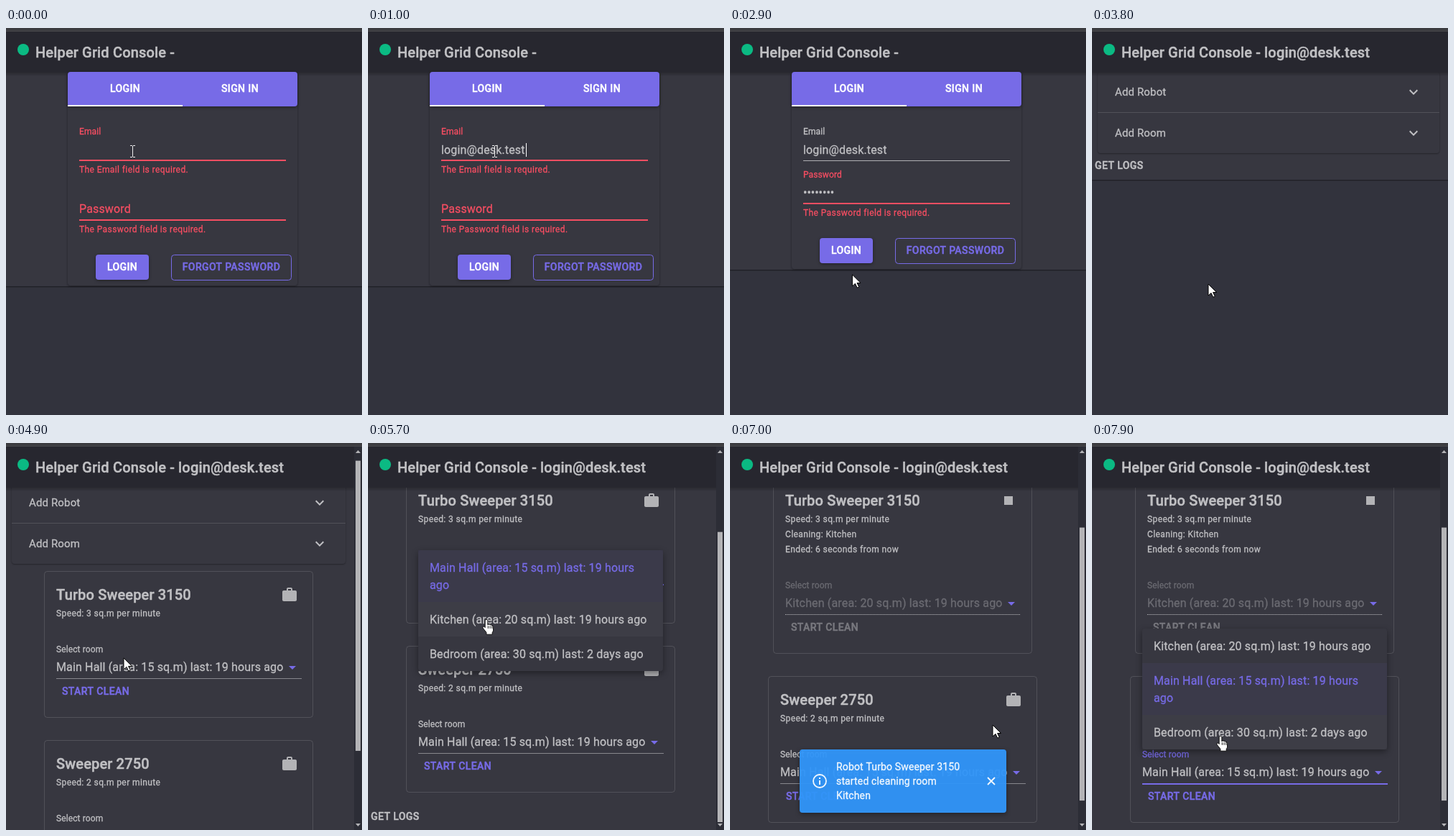
These frames come from a looping animation (496x538 px, 8000 ms). An HTML page with a canvas:

```html
<!DOCTYPE html>
<html lang="en">
<head>
<meta charset="utf-8">
<title>Robot control panel</title>
<style>
html, body { margin: 0; width: 100%; height: 100%; overflow: hidden; background: #32333d; }
canvas { display: block; width: 496px; height: 538px; }
</style>
</head>
<body>
<canvas id="stage" width="496" height="538"></canvas>
<script>
const c = document.getElementById('stage').getContext('2d');
const W = 496, H = 538, LOOP = 8000, BAR_TOP = 5;
const BG = '#32333d', SURFACE = '#373740', PRIMARY = '#776be7', ERROR = '#f64e62';
const TEXT = '#c1c1c4', FADED = '#6b6b72', LINE = 'rgba(255,255,255,.13)';
const white = a => `rgba(255,255,255,${a})`;

const EMAIL = 'login@desk.test';
const BOT_A = 'Turbo Sweeper 3150', BOT_B = 'Sweeper 2750';
const KITCHEN = 'Kitchen (area: 20 sq.m) last: 19 hours ago';
const HALL = 'Main Hall (area: 15 sq.m) last: 19 hours ago';
const BEDROOM = 'Bedroom (area: 30 sq.m) last: 2 days ago';

const ICON = {
  work: new Path2D('M10 2h4c1.1 0 2 .9 2 2v2h4c1.1 0 2 .9 2 2v11c0 1.1-.9 2-2 2H4c-1.1 0-2-.9-2-2V8c0-1.1.9-2 2-2h4V4c0-1.1.9-2 2-2zm4 4V4h-4v2h4z'),
  stop: new Path2D('M6 6h12v12H6z'),
  chevron: new Path2D('M16.6 8.6L12 13.2 7.4 8.6 6 10l6 6 6-6z'),
  drop: new Path2D('M7 10l5 5 5-5z'),
  arrow: new Path2D('M0 0v16l4-3.6 2.7 5.8 2.6-1.2-2.7-5.5h5z'),
  hand: new Path2D('M-2 1.5q2-3 4 0v7l1-.8q2-.6 2.6.8q2.2-.6 2.8 1q2-.2 2 2v5q0 2-1.5 3.5v3h-9v-3l-5.5-7q-.5-2.5 2-2l1.6 1.6z')
};

// Pointer keys: time, x, y, shape used until the next key
const POINTER = [
  [0, 176, 171, 'beam'], [2050, 176, 171, 'arrow'], [2400, 190, 412, 'arrow'],
  [2750, 176, 362, 'arrow'], [3100, 162, 314, 'hand'], [3650, 162, 314, 'arrow'],
  [3790, 162, 356, 'arrow'], [4650, 162, 356, 'arrow'], [5300, 168, 184, 'hand'],
  [5550, 168, 184, 'hand'], [5680, 165, 245, 'hand'], [5850, 165, 245, 'hand'],
  [6000, 130, 212, 'hand'], [6120, 130, 212, 'arrow'], [6280, 272, 318, 'arrow'],
  [6400, 272, 318, 'arrow'], [6680, 365, 365, 'hand'], [6800, 365, 365, 'arrow'],
  [6980, 366, 392, 'arrow'], [7050, 366, 392, 'arrow'], [7220, 365, 469, 'hand'],
  [7340, 365, 469, 'hand'], [7480, 300, 457, 'hand'], [7600, 300, 457, 'hand'],
  [7850, 179, 407, 'hand']
];

const clamp = v => Math.max(0, Math.min(1, v));
const ease = (t, from, to) => { const p = clamp((t - from) / (to - from)); return p * p * (3 - 2 * p); };
const mix = (a, b, p) => a + (b - a) * p;

// y is the middle of the capital letters; the thin stroke gives the text its weight
function text(s, x, y, size, color = TEXT, { weight = 400, gap = .0094, align = 'left' } = {}) {
  c.font = `${weight} ${size}px Roboto, Arial, sans-serif`;
  c.letterSpacing = gap * size + 'px';
  c.textAlign = align;
  c.fillStyle = c.strokeStyle = color;
  c.lineWidth = weight > 400 ? .45 : .3;
  c.lineJoin = 'round';
  const base = Math.round(y + size * .355);
  c.fillText(s, x, base);
  c.strokeText(s, x, base);
}
const title = (s, x, y) => text(s, x, y, 20, TEXT, { weight: 500, gap: .0075 });
const caption = (s, x, y, color) => text(s, x, y, 12, color, { gap: .0333 });
const button = (s, x, y, color, align) => text(s, x, y, 14, color, { weight: 500, gap: .0286, align });

function rect(x, y, w, h, color) { c.fillStyle = color; c.fillRect(x, y, w, h); }
function round(x, y, w, h, r) { c.beginPath(); c.roundRect(x, y, w, h, r); }
function box(x, y, w, h, color, r = 4, blur = 0) {
  c.save();
  if (blur) { c.shadowColor = 'rgba(0,0,0,.4)'; c.shadowBlur = blur; c.shadowOffsetY = blur / 3; }
  round(x, y, w, h, r);
  c.fillStyle = color;
  c.fill();
  c.restore();
}
function outline(x, y, w, h, color) {
  round(x + .5, y + .5, w - 1, h - 1, 4);
  c.strokeStyle = color; c.lineWidth = 1; c.stroke();
}
function icon(name, x, y, color) {
  c.save(); c.translate(x, y); c.fillStyle = color; c.fill(ICON[name], 'evenodd'); c.restore();
}
function faded(alpha, draw) {
  if (alpha <= 0) return;
  c.save(); c.globalAlpha = alpha; draw(); c.restore();
}

function paper(bottom) {
  rect(0, BAR_TOP, W, bottom - BAR_TOP, SURFACE);
  rect(0, bottom, W, 1, '#202027');
  rect(0, bottom + 1, W, 1, 'rgba(0,0,0,.14)');
}

function header(email) {
  rect(0, 0, W, BAR_TOP, '#3c3c40');
  rect(0, 4, W, 1, '#47474b');
  for (let i = 0; i < 5; i++) rect(0, 62 + i, W, 1, `rgba(0,0,0,${.2 - i * .04})`);
  rect(0, BAR_TOP, W, 57, '#27272f');
  c.beginPath(); c.arc(24, 30, 8, 0, 7);
  c.fillStyle = '#0bba83'; c.fill();
  title('Helper Grid Console - ' + email, 41, 34);
}

function login(t) {
  const done = t >= 1050, up = done ? 23 : 0;
  paper(359 - up);
  box(86, 62, 320, 296 - up, SURFACE, 4, 3);
  header('');
  box(86, 61, 320, 48, PRIMARY, 4, 4);
  rect(86, 107, 160, 2, '#fff');
  button('LOGIN', 166, 84, '#fff', 'center');
  button('SIGN IN', 326, 84, '#fff', 'center');

  text('Email', 102, 144, 12, done ? TEXT : ERROR);
  const typed = EMAIL.slice(0, Math.max(0, Math.floor((t - 40) / 60)));
  text(typed, 102, 169, 16);
  if (!done && t >= 100) rect(103 + Math.round(c.measureText(typed).width), 160, 1, 19, '#fff');
  if (done) rect(102, 184, 288, 1, white(.6));
  else {
    rect(102, 183, 288, 2, ERROR);
    caption('The Email field is required.', 102, 197, ERROR);
  }

  const shrink = ease(t, 1050, 1250);
  text('Password', 102, mix(251 - up, 204, shrink), mix(16, 12, shrink), ERROR);
  if (done) {
    const dots = '•'.repeat(Math.max(0, Math.min(8, Math.floor((t - 1150) / 150))));
    text(dots, 102, 228, 16, TEXT, { gap: 0 });
    const end = Math.round(c.measureText(dots).width);
    if (t < 2600 || t % 1000 < 500) rect(102 + end, 219, 1, 19, '#fff');
  }
  rect(102, 266 - up, 288, 2, ERROR);
  caption('The Password field is required.', 102, 280 - up, ERROR);

  box(125, 315 - up, 74, 35, PRIMARY, 4, 4);
  button('LOGIN', 162, 332 - up, '#fff', 'center');
  outline(230, 315 - up, 168, 36, PRIMARY);
  button('FORGOT PASSWORD', 314, 332 - up, PRIMARY, 'center');
}

function panels(right) {
  box(8, 61, right - 8, 113, SURFACE, 4, 2);
  rect(8, 117, right - 8, 1, LINE);
  ['Add Robot', 'Add Room'].forEach((s, i) => {
    text(s, 32, 89 + i * 57, 15);
    icon('chevron', right - 48, 77 + i * 57, TEXT);
  });
}

function card(x, y, name, speed, room, { busy = false, focus = false } = {}) {
  const w = 2 * (240.5 - x), right = x + w, left = x + 17, grow = busy ? 42 : 0, low = y + grow;
  outline(x, y, w, 204 + grow, LINE);
  title(name, left, y + 33);
  icon(busy ? 'stop' : 'work', right - 45, y + 21, white(.62));
  caption(`Speed: ${speed} sq.m per minute`, left, y + 59);
  if (busy) {
    caption('Cleaning: Kitchen', left, y + 80);
    caption('Ended: 6 seconds from now', left, y + 101);
  }
  text('Select room', left, low + 109, 12, busy ? FADED : focus ? PRIMARY : TEXT);
  text(room, left, low + 133, 16, busy ? FADED : TEXT);
  icon('drop', right - 41, low + 122, PRIMARY);
  const len = right - 16 - left;
  if (busy) for (let i = 0; i < len; i += 2) rect(left + i, low + 149, 1, 1, TEXT);
  else rect(left, low + 149, len, focus ? 2 : 1, focus ? PRIMARY : white(.4));
  button('START CLEAN', x + 25, low + 167, busy ? '#79797f' : PRIMARY);
}

function menu(y, rooms, hover) {
  box(70, y, 341, 168, SURFACE, 4, 10);
  for (const room of rooms) {
    const chosen = room === HALL, h = chosen ? 72 : 48;
    if (chosen) rect(70, y, 341, h, 'rgba(119,107,231,.06)');
    else if (room === hover) rect(70, y, 341, h, white(.03));
    if (chosen) {
      text(HALL.slice(0, -4), 86, y + 24, 16, PRIMARY);
      text('ago', 86, y + 48, 16, PRIMARY);
    } else text(room, 86, y + 24, 16);
    y += h;
  }
}

function toast(y) {
  c.globalAlpha *= .93;
  box(97, y, 288, 88, '#3299ff', 4, 6);
  ['Robot ' + BOT_A, 'started cleaning room', 'Kitchen'].forEach((s, i) =>
    text(s, 148, y + 24 + i * 20, 14, '#fff', { gap: .0107 }));
  rect(124, y + 39, 2, 2, '#fff');
  rect(124, y + 43, 2, 6, '#fff');
  c.strokeStyle = '#fff'; c.lineWidth = 1.8;
  c.beginPath(); c.arc(125, y + 44, 9, 0, 7); c.stroke();
  c.beginPath();
  c.moveTo(359, y + 39); c.lineTo(369, y + 49);
  c.moveTo(369, y + 39); c.lineTo(359, y + 49);
  c.stroke();
}

function scrollbar(content, scroll) {
  const top = 20, track = 507;
  rect(485, BAR_TOP, 11, H - BAR_TOP, '#2c2d36');
  rect(487, top + scroll / content * track, 7, 533 / content * track, '#b4b4b7');
  c.fillStyle = '#b4b4b7';
  for (const [y, d] of [[14, -4], [529, 4]]) {
    c.beginPath(); c.moveTo(487, y); c.lineTo(494, y); c.lineTo(490.5, y + d); c.fill();
  }
}

function home(t) {
  const loaded = t >= 4650, picked = t >= 5850, busy = t >= 6180;
  const scroll = 137 * ease(t, 4850, 5250), grow = busy ? 42 : 0;
  c.save();
  c.translate(0, -Math.round(scroll));
  paper(loaded ? 675 + grow : 211);
  panels(loaded ? 473 : 484);
  if (loaded) {
    card(picked ? 60 : 53, 184, BOT_A, 3, picked ? KITCHEN : HALL, { busy, focus: t >= 5480 && !busy });
    card(53, 419 + grow, BOT_B, 2, HALL, { focus: t >= 7550 });
  }
  button('GET LOGS', 4, loaded ? 656 + grow : 191, TEXT);
  c.restore();
  header(EMAIL);
  if (!loaded) return;
  scrollbar(670 + grow, scroll);

  faded(ease(t, 5480, 5660) - ease(t, 5830, 5960), () =>
    menu(149, [HALL, KITCHEN, BEDROOM], t >= 5640 && KITCHEN));
  faded(ease(t, 7580, 7780), () =>
    menu(258, [KITCHEN, HALL, BEDROOM], t >= 7750 && BEDROOM));
  faded(ease(t, 6180, 6290) - ease(t, 6740, 6940), () => toast(322));
  faded(ease(t, 6180, 6290) - ease(t, 7290, 7500), () => toast(426));
}

function pointer(t) {
  const i = POINTER.findLastIndex(k => k[0] <= t);
  const [t0, x0, y0, shape] = POINTER[i], [t1, x1, y1] = POINTER[i + 1] || [LOOP, x0, y0];
  const p = ease(t, t0, t1);
  c.save();
  c.translate(mix(x0, x1, p), mix(y0, y1, p));
  if (shape === 'beam') {
    rect(0, -7, 1, 15, '#eee');
    for (const y of [-8, 8]) { rect(-3, y, 3, 1, '#eee'); rect(1, y, 3, 1, '#eee'); }
  } else {
    if (shape === 'hand') c.scale(.92, .92);
    c.fillStyle = '#fff'; c.strokeStyle = '#000'; c.lineWidth = 1;
    c.fill(ICON[shape]); c.stroke(ICON[shape]);
    if (shape === 'hand') for (const x of [2, 5, 8]) rect(x, 10, 1, 4, '#000');
  }
  c.restore();
}

function frame(now) {
  const t = now % LOOP;
  rect(0, 0, W, H, BG);
  if (t < 3700) login(t); else home(t);
  pointer(t);
  requestAnimationFrame(frame);
}
requestAnimationFrame(frame);
</script>
</body>
</html>
```
